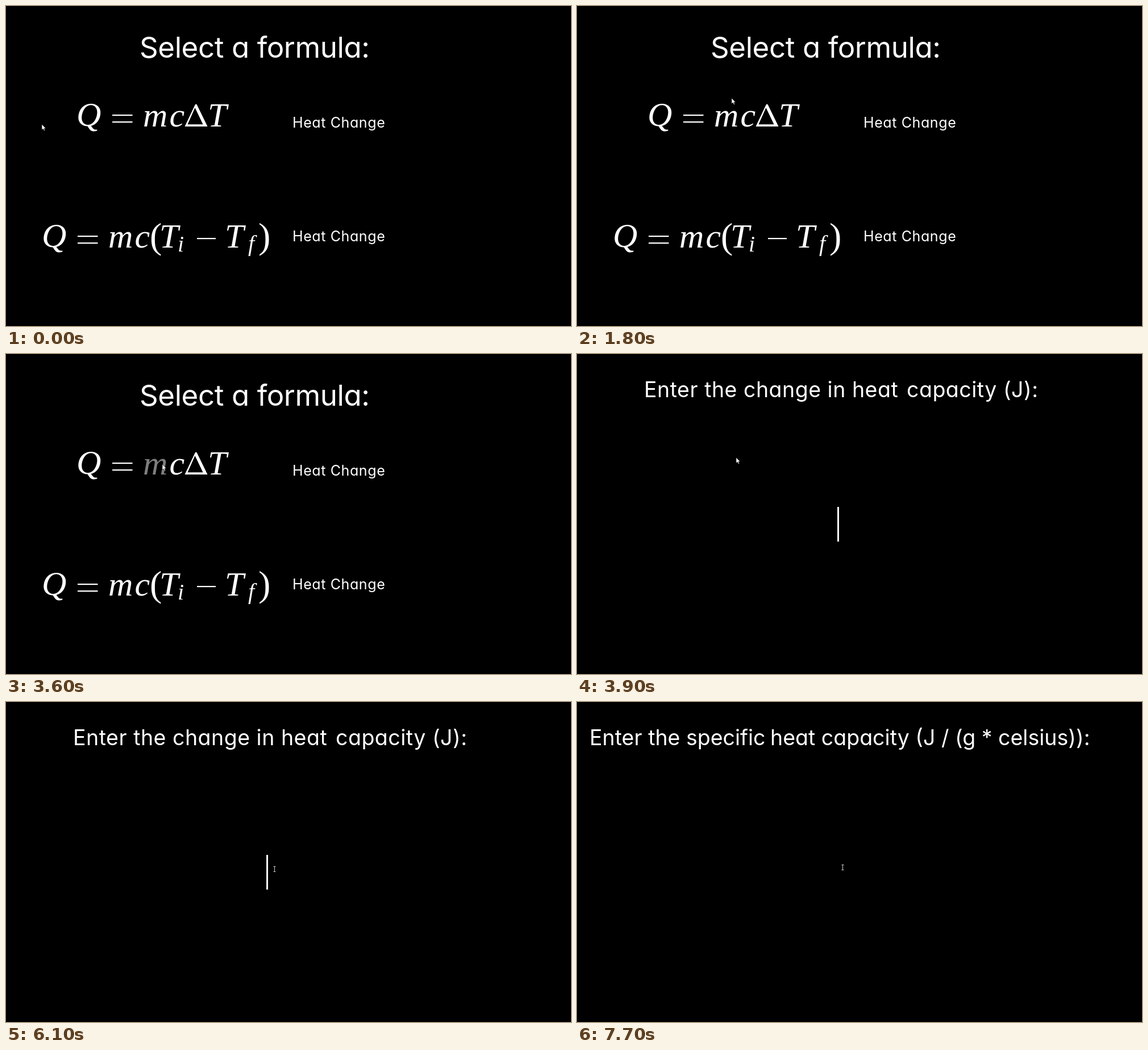
Animation, 994 px wide and 563 px high, one loop 8 s. Source, as an HTML page:

```html
<!DOCTYPE html>
<html lang="en">
<head>
<meta charset="utf-8">
<title>Formula picker</title>
<style>
html, body { margin: 0; width: 100%; height: 100%; overflow: hidden; background: #000; }
svg { display: block; width: 994px; height: 563px; fill: #fff; }
.ui { font-family: Inter, "Noto Sans", sans-serif; font-feature-settings: "cv11"; }
.title { font-size: 51px; letter-spacing: -.4px; }
.label { font-size: 25px; letter-spacing: .6px; }
.prompt { font-size: 37.5px; }
.wide { letter-spacing: .5px; }
#digits { font-size: 38px; letter-spacing: .7px; text-anchor: middle; }
.math { font: italic 60px "Liberation Serif", serif; }
.paren { font-style: normal; font-size: 64px; }
.sub { font-size: 40px; }
#beam { mix-blend-mode: difference; }
</style>
</head>
<body>
<svg viewBox="0 0 994 563">
  <g id="menu">
    <g class="ui">
      <text class="title" x="235" y="91">Select a formula:</text>
      <text class="label" x="504" y="214">Heat Change</text>
      <text class="label" x="504" y="414">Heat Change</text>
    </g>
    <g class="math">
      <g id="start">
        <text class="hot" x="124" y="211">Q</text>
        <path d="M187 191h35.5v2.2H187zM187 203h35.5v2.2H187z"/>
        <text class="hot" x="241" y="212">m</text>
        <text class="hot" x="287.5" y="212">c</text>
      </g>
      <path class="hot" d="M314.5 212L333 173h2.5L354.5 212zM319.5 208.3H346.5L332.5 179z" fill-rule="evenodd"/>
      <text class="hot" x="355" y="212">T</text>
    </g>
    <g id="second" class="math" transform="translate(-61 213)">
      <text class="paren" x="314" y="213">(</text>
      <text x="331" y="212">T</text>
      <text class="sub" x="363" y="219">i</text>
      <rect x="397" y="195" width="33" height="2.2"/>
      <text x="446" y="212">T</text>
      <text class="sub" x="487" y="218">f</text>
      <text class="paren" x="505" y="213">)</text>
    </g>
  </g>
  <g id="heat" class="ui prompt wide">
    <text x="118" y="76">Enter the change in heat</text>
    <text x="580" y="76">capacity (J):</text>
  </g>
  <g id="specific" class="ui prompt">
    <text x="22" y="76">Enter the specific</text>
    <text x="340" y="76">heat capacity (J / (g * celsius)):</text>
  </g>
  <g id="input" class="ui">
    <text id="digits" x="458" y="313"></text>
    <rect id="caret" y="269" width="3" height="61"/>
  </g>
  <path id="arrow" d="M0 0V10l2.3-2 1.7 3.5 1.6-.7-1.6-3.3h3z" stroke="#000" stroke-width=".6"/>
  <path id="beam" d="M.5 .5H4.5M2.5 .5V9.5M.5 9.5H4.5" fill="none" stroke="#ccc"/>
</svg>
<script>
const $ = id => document.getElementById(id);
const hot = [...document.querySelectorAll(".hot")];
$("second").prepend(...[...$("start").children].map(el => el.cloneNode(true)));

// Pointer moves: start time, end time, goal x, goal y, upward bow
const moves = [
  [300, 700, 139, 180], [700, 1100, 202, 143], [1100, 1800, 272, 162, 4],
  [1800, 2100, 297, 180], [2100, 2500, 374, 184, 19], [2800, 3000, 218, 148, 27],
  [3100, 3400, 269, 188, 12], [3500, 3600, 275, 194], [3800, 4000, 284, 170],
  [4100, 4400, 462, 235, 35], [4500, 4900, 466, 288], [5100, 5400, 470, 289],
  [7600, 7700, 465, 286]];

function pointer(t) {
  let x = 63, y = 208;
  for (const [from, to, goalX, goalY, bow = 0] of moves) {
    const k = Math.min(1, Math.max(0, (t - from) / (to - from)));
    x += (goalX - x) * k;
    y += (goalY - y) * k - bow * Math.sin(Math.PI * k);
  }
  return [Math.round(x), Math.round(y)];
}

const show = (id, on) => $(id).style.display = on ? "" : "none";

function draw(now) {
  const t = Math.floor(now % 8000 / 100) * 100;
  const [x, y] = pointer(t);
  show("menu", t < 3900);
  show("heat", t >= 3900 && t < 7000);
  show("specific", t >= 7000);
  show("input", t >= 3900);
  show("arrow", t < 4000);
  show("beam", t >= 4000);
  for (const id of ["arrow", "beam"])
    $(id).setAttribute("transform", `translate(${x} ${y})`);

  for (const el of hot) {
    const box = el.getBBox();
    const over = x >= box.x && x <= box.x + box.width && y >= 172 && y <= 222;
    el.setAttribute("fill", over ? "#7f7f7f" : "#fff");
  }

  const typed = t >= 7000 ? 0 : [6300, 6500, 6600].filter(key => t >= key).length;
  $("digits").textContent = "600".slice(0, typed);
  $("caret").setAttribute("x", Math.round(458 + 12.1 * typed));
  show("caret", (t - 3700) % 2400 < 1200);
}

const begin = performance.now();
function tick() {
  draw(performance.now() - begin);
  requestAnimationFrame(tick);
}
tick();
</script>
</body>
</html>
```
